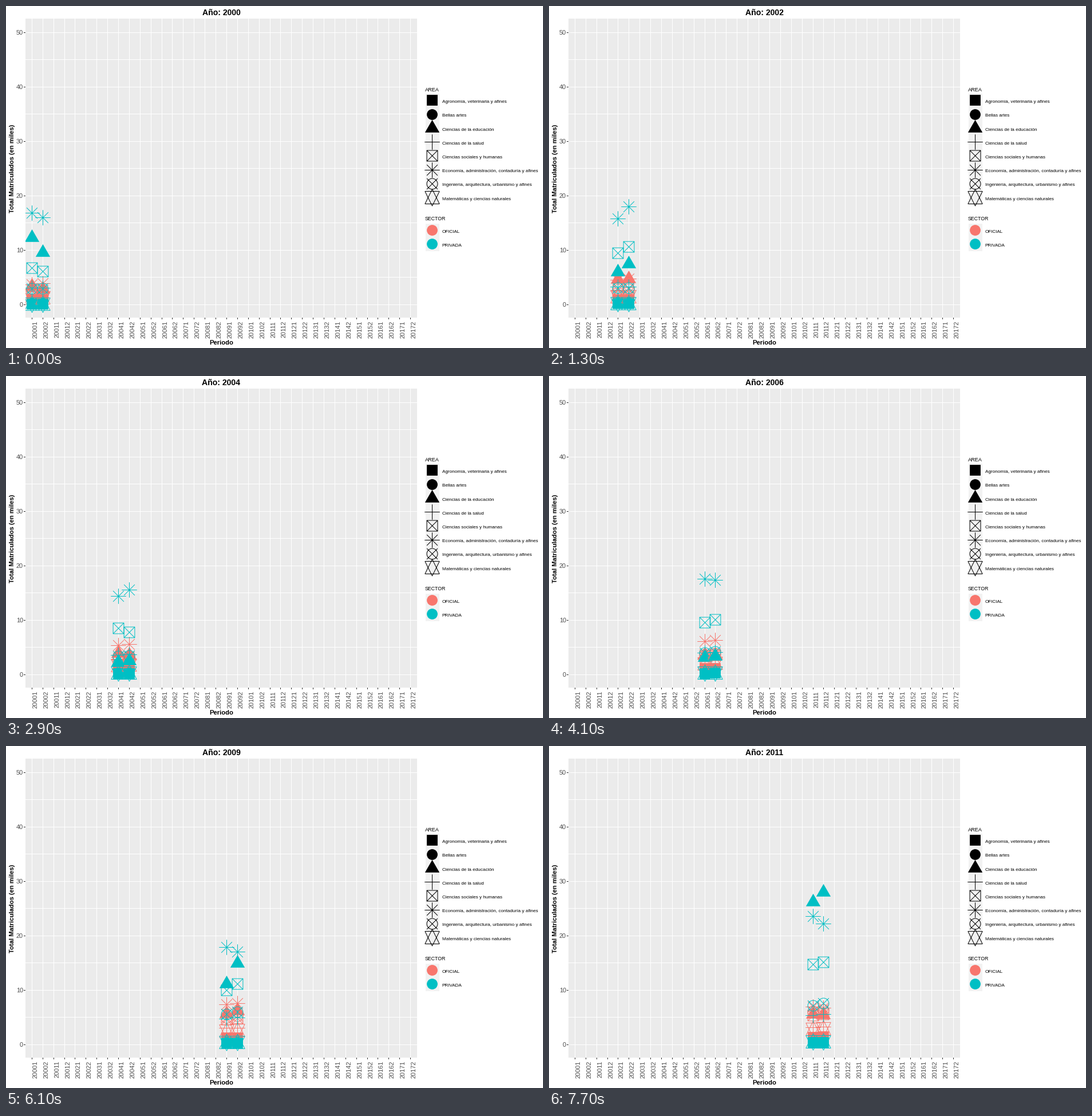
Write a matplotlib script that moves like this. It is 938 px wide and 597 px high and loops after 8000 ms.

```python
import numpy as np
import matplotlib.pyplot as plt
from matplotlib.animation import FuncAnimation
from matplotlib.collections import LineCollection
from matplotlib.patches import PathPatch, Rectangle
from matplotlib.path import Path

W, H, DPI = 938, 597, 100
PX = 72 / DPI
LEFT, TOP, RIGHT, BOTTOM = 34, 22, 718, 544
STEP = (RIGHT - LEFT) / 36.2
R = 9.4
RED, TEAL = "#F8766D", "#00BFC4"
AREAS = ["Agronomía, veterinaria y afines", "Bellas artes",
         "Ciencias de la educación", "Ciencias de la salud",
         "Ciencias sociales y humanas",
         "Economía, administración, contaduría y afines",
         "Ingeniería, arquitectura, urbanismo y afines",
         "Matemáticas y ciencias naturales"]
FILLED = 3  # the first three areas use solid symbols

plt.rcParams["font.family"] = "Liberation Sans"
fig = plt.figure(figsize=(W / DPI, H / DPI), dpi=DPI, facecolor="white")
ax = fig.add_axes([0, 0, 1, 1])
ax.set_xlim(0, W)
ax.set_ylim(H, 0)
ax.axis("off")


def x_at(index):
    return LEFT + (0.6 + index) * STEP


def y_at(value):
    return 521.2 - 9.5 * value


def pixel(v):
    return np.floor(v) + 0.5


# ---- plotting symbols -------------------------------------------------
def closed(points):
    return Path(list(points) + [points[0]], closed=True)


def segments(*pairs):
    return [Path(p) for p in pairs]


def make_symbols():
    tip, half, base = 1.5555 * R, 1.3467 * R, 0.7777 * R
    arm, mid = np.sqrt(2) * R, (1.5555 + 0.7777) / 2 * R
    square = closed([(-R, -R), (R, -R), (R, R), (-R, R)])
    disc = Path.circle((0, 0), R)
    plus = segments([(-arm, 0), (arm, 0)], [(0, -arm), (0, arm)])
    cross = segments([(-R, -R), (R, R)], [(-R, R), (R, -R)])
    up = closed([(0, -tip), (half, mid), (-half, mid)])
    down = closed([(0, tip), (half, -mid), (-half, -mid)])
    parts = [[square], [disc],
             [closed([(0, -tip), (half, base), (-half, base)])],
             plus, [square] + cross, plus + cross, [disc] + cross, [up, down]]
    return [Path.make_compound_path(*p) for p in parts]


SYMBOLS = make_symbols()


def placed(area, x, y):
    path = SYMBOLS[area]
    return Path(path.vertices + [pixel(x), pixel(y)], path.codes)


def add_symbol(area, x, y, color, zorder=5):
    solid = area < FILLED
    patch = PathPatch(placed(area, x, y), facecolor=color if solid else "none",
                      edgecolor="none" if solid else color, lw=PX,
                      capstyle="butt", snap=False, zorder=zorder)
    return ax.add_patch(patch)


# ---- enrolment in thousands, by years since 2000 ----------------------
def trend(start, end, power=1.0):
    return lambda t: start + (end - start) * (t / 11.5) ** power


def through(*points):
    return lambda t: np.interp(t, *zip(*points))


OFFICIAL = [
    trend(0.9, 1.4, 1.5),
    trend(0.6, 1.2, 1.5),
    through((0, 3.3), (0.5, 2.8), (2.25, 4.9), (4.5, 3.5), (7, 3.5), (9.5, 6.2), (11.5, 5.4)),
    trend(2.4, 3.2),
    trend(1.5, 5.6, 1.2),
    through((0, 3.7), (6, 6.1), (9.5, 7.6), (11.5, 6.7)),
    trend(2.6, 6.4, 2),
    trend(1.2, 2.9, 1.2),
]
PRIVATE = [
    trend(0.1, 0.35),
    trend(0.2, 0.4),
    through((0, 12.3), (0.5, 9.6), (2, 6), (2.5, 7.4), (4, 2.3), (7, 3.6), (9, 11.1),
            (11, 26.2), (11.5, 28)),
    trend(3.0, 5.5, 1.5),
    through((0, 6.7), (0.5, 6.1), (2.5, 10.6), (4.5, 7.8), (7, 10.7), (9, 10), (11, 14.7),
            (11.5, 15.1)),
    through((0, 16.8), (0.5, 16), (2, 15.8), (2.5, 18), (4, 14.4), (5.5, 17.7), (6.5, 17.3),
            (7, 13.2), (9, 17.9), (9.5, 17), (11, 23.5), (11.5, 22.2)),
    trend(2.9, 7.6, 2.3),
    trend(0.1, 0.5),
]


# ---- fixed parts ------------------------------------------------------
def label(x, y, text, size, color="black", **kw):
    kw.setdefault("va", "baseline")
    return ax.text(x, y, text, fontsize=size * PX, color=color, **kw)


def box(x0, y0, x1, y1, color):
    return ax.add_patch(Rectangle((x0, y0), x1 - x0, y1 - y0, fc=color, ec="none",
                                  zorder=0))


def rules(lines, color):
    ax.add_collection(LineCollection(lines, colors=color, linewidths=PX,
                                     capstyle="butt", snap=False, zorder=1))


panel = box(LEFT, TOP, RIGHT, BOTTOM, "#EBEBEB")
grid, ticks = [], []
for value in range(0, 51, 5):
    y = pixel(y_at(value))
    grid.append([(LEFT, y), (RIGHT, y)])
    if value % 10 == 0:
        ticks.append([(LEFT - 3, y), (LEFT, y)])
        label(30, y + 0.7, str(value), 11, "#4D4D4D", ha="right", va="center")
for i in range(36):
    x = pixel(x_at(i))
    grid.append([(x, TOP), (x, BOTTOM)])
    ticks.append([(x, BOTTOM), (x, BOTTOM + 3)])
    label(x + 5.7, 564.5, f"{2000 + i // 2}{i % 2 + 1}", 11, "#4D4D4D",
          rotation=90, ha="center", va="center")
rules(grid, "white")
rules(ticks, "#333333")

title = label(376, 16, "", 14, weight="bold", ha="center")
label(376, 591, "Periodo", 11.2, weight="bold", ha="center")
label(11.5, 284, "Total Matriculados (en miles)", 11.3, weight="bold",
      rotation=90, ha="center", va="center")

KEY_X, ROW = 744.5, 24.25
label(732, 149, "AREA", 9.1)
box(733, 153, 757, 347, "#F2F2F2")
for i, name in enumerate(AREAS):
    add_symbol(i, KEY_X, 164.8 + ROW * i, "black")
    label(761.5, 169 + ROW * i, name, 8.1)
label(732, 374.5, "SECTOR", 8.8)
box(733, 380, 757, 428, "#F2F2F2")
for i, (name, color) in enumerate([("OFICIAL", RED), ("PRIVADA", TEAL)]):
    add_symbol(1, KEY_X, 391.6 + 24 * i, color)
    label(761.5, 395.6 + 24 * i, name, 8.1)

# ---- moving points ----------------------------------------------------
points = []
for semester in range(2):
    for curves, color in ((OFFICIAL, RED), (PRIVATE, TEAL)):
        for area, curve in enumerate(curves):
            patch = add_symbol(area, 0, 0, color, zorder=3)
            patch.set_clip_path(panel)
            points.append((patch, area, semester, curve))

# 17 yearly transitions share 29 whole steps
YEARS = np.arange(18)
YEAR_STEPS = np.round(YEARS * 29 / 17)


def update(frame):
    step = max(0, (frame - 1) // 4)
    year = np.interp(step, YEAR_STEPS, YEARS)
    before, after = np.floor(year), np.ceil(year)
    title.set_text(f"Año: {2000 + round(17 * step / 29)}")
    for patch, area, semester, curve in points:
        value = (curve(before + semester / 2) + curve(after + semester / 2)) / 2
        patch.set_path(placed(area, x_at(2 * year + semester), y_at(value)))
    return [title] + [p[0] for p in points]


anim = FuncAnimation(fig, update, frames=80, interval=100, repeat=True,
                     repeat_delay=0, blit=False)
plt.show()
```
